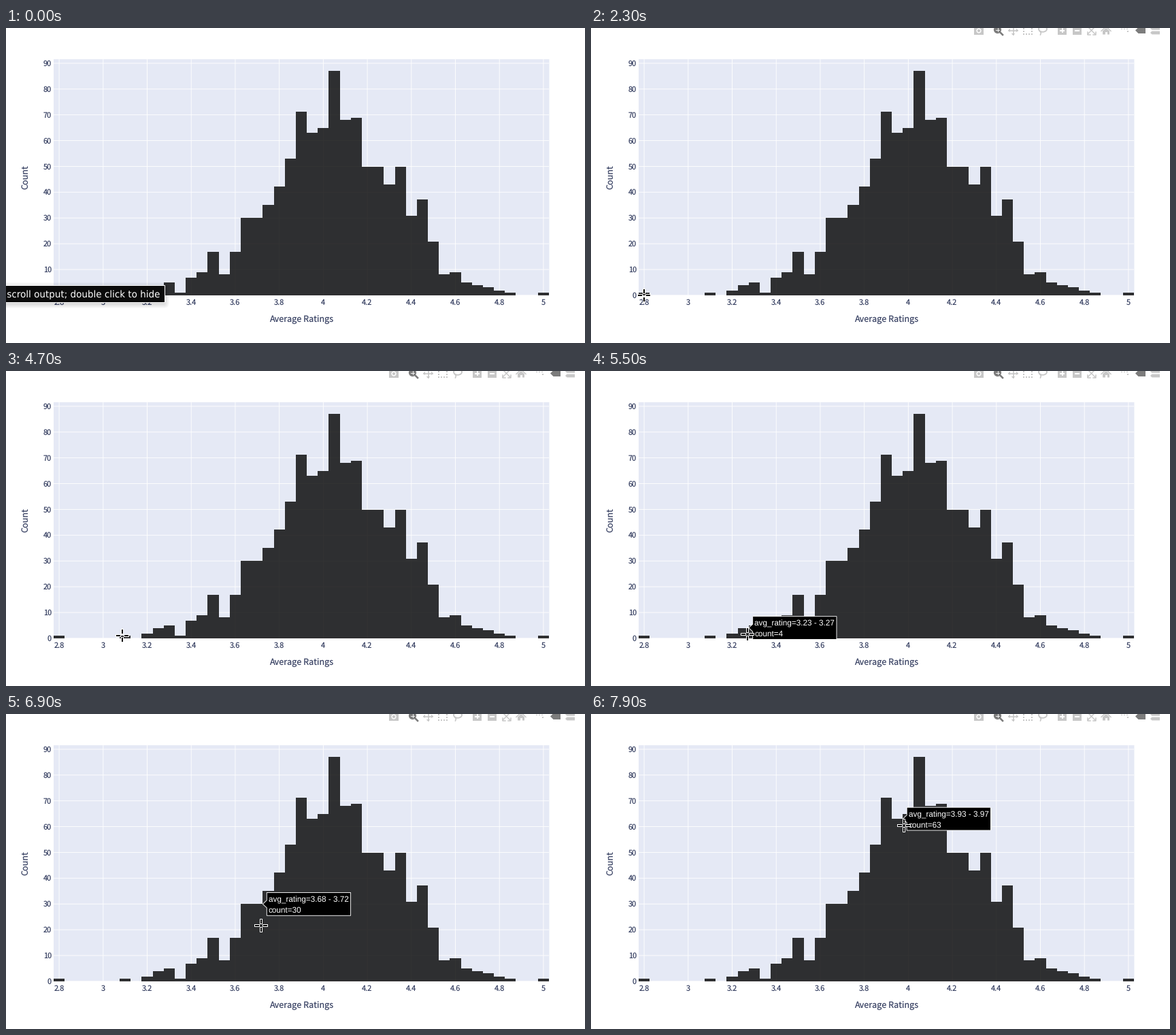
Animation of 851x463 px, one loop 8000 ms. Source, as a matplotlib script:

```python
import matplotlib.pyplot as plt
import numpy as np
from matplotlib.animation import FuncAnimation
from matplotlib.collections import PolyCollection
from matplotlib.patches import Circle, Ellipse, FancyBboxPatch, Polygon, Rectangle

plt.rcParams["text.hinting"] = "none"

W, H, DPI = 851, 463, 64
PT = 72 / DPI  # points per pixel
FRAMES, STEP = 80, 100

LEFT, RIGHT, TOP, BASE = 70, 798, 45.9, 392.88
ZOOM = 0.901  # page zoom: bars sit on whole page pixels before scaling
X_MIN, X_MAX, BIN = 2.775, 5.025, 0.05
UNIT = 347 * 0.95 / 87

INK = "#3c4566"
PLOT_BG = "#e5e9f5"
IDLE, ACTIVE = "#c7c7c7", "#7c7c7c"

# The charted data: one count per bin.
COUNTS = [1, 0, 0, 0, 0, 0, 1, 0, 2, 4, 5, 1, 7, 9, 17, 8, 17, 30, 30, 35,
          42, 53, 71, 63, 65, 87, 68, 69, 50, 50, 43, 50, 31, 37, 21, 8, 9,
          5, 4, 3, 2, 1, 0, 0, 1]

ENTER, FADE = 0.8, 0.4  # pointer enters, toolbar fades in (seconds)
LAG = 0.02  # the hover label trails the pointer

# Key points of the pointer: seconds, x, y.
PATH = np.array([
    (ENTER, 95, 384), (1.0, 135, 385), (1.3, 123, 391), (1.7, 81, 399),
    (2.0, 74, 397), (2.5, 81, 391), (3.8, 81, 391), (4.5, 168, 389),
    (4.7, 171, 389), (5.1, 174, 392), (5.3, 174, 394), (5.5, 230, 387),
    (5.7, 235, 386), (6.2, 292, 366), (6.5, 318, 352), (6.7, 349, 339),
    (6.9, 375, 311), (7.3, 420, 253), (7.9, 459.5, 164),
])

fig = plt.figure(figsize=(W / DPI, H / DPI), dpi=DPI, facecolor="white")
ax = fig.add_axes([0, 0, 1, 1])
ax.set_xlim(0, W)
ax.set_ylim(H, 0)
ax.axis("off")


def add(patch):
    return ax.add_patch(patch)


def box(x0, y0, x1, y1, color, z=1, smooth=False, **kw):
    return add(Rectangle((x0, y0), x1 - x0, y1 - y0, fc=color, lw=0,
                         aa=smooth, snap=not smooth, zorder=z, **kw))


def label(x, y, s, size, font="Noto Sans CJK JP", color=INK, **kw):
    return ax.text(x, y, s, fontsize=size * PT, family=font, color=color,
                   va="baseline", **kw)


def rating_x(value):
    return LEFT + (value - X_MIN) / (X_MAX - X_MIN) * (RIGHT - LEFT)


def bin_left(k):
    return rating_x(X_MIN + BIN * k)


def count_y(n):
    return BASE - n * UNIT


def bar_top(n):
    return BASE - round(n * UNIT / ZOOM) * ZOOM


def draw_chart():
    half = ZOOM / 2
    box(LEFT, TOP, RIGHT + half, BASE, PLOT_BG, smooth=True)
    for value in np.arange(2.8, 5.1, 0.2):
        x = rating_x(value)
        box(x - half, TOP, x + half, BASE, "white", 2, smooth=True)
        label(x, 407, f"{value:.1f}".replace(".0", ""), 11, ha="center")
    for n in range(0, 100, 10):
        y = count_y(n)
        box(LEFT, y - half, RIGHT, y + half, "white", 2, smooth=True)
        label(67, y + 4, str(n), 11, ha="right")
    for k, n in enumerate(COUNTS):
        if n:
            box(round(bin_left(k)), round(bar_top(n)),
                round(bin_left(k + 1)), round(BASE), "black", 3, alpha=0.8)
    label(434, 432, "Average Ratings", 12.6, ha="center")
    label(32, 219.5, "Count", 12.6, ha="center", rotation=90,
          rotation_mode="anchor")


def draw_toolbar():
    parts = []

    def shape(*pts, color=IDLE):
        parts.append(add(Polygon(pts, fc=color, lw=0)))

    def rect(x, y, w, h, color=IDLE):
        shape((x, y), (x + w, y), (x + w, y + h), (x, y + h), color=color)

    def line(xs, ys, width, color=IDLE):
        parts.extend(ax.plot(xs, ys, color=color, lw=width * PT))

    def disc(x, y, r, color):
        parts.append(add(Circle((x, y), r, fc=color, lw=0)))

    def tag(x, y, w, h, color=IDLE):
        shape((x, y), (x + h / 2, y - h / 2), (x + w, y - h / 2),
              (x + w, y + h / 2), (x + h / 2, y + h / 2), color=color)

    # camera
    rect(563, -1, 14, 10.5)
    disc(570, 4, 3.6, "white")
    disc(570, 4, 2.1, IDLE)
    # magnifier
    disc(597.5, 2.5, 5.6, ACTIVE)
    line([595, 600], [2.5, 2.5], 0.9, "white")
    line([597.5, 597.5], [0, 5], 0.9, "white")
    line([601, 605], [6, 10], 2.6, ACTIVE)
    # pan
    line([614, 627], [3.5, 3.5], 1.6)
    line([620.5, 620.5], [-3, 10], 1.6)
    for s in (-1, 1):
        tip = 620.5 + 7.5 * s
        shape((tip, 3.5), (tip - 3 * s, 0.8), (tip - 3 * s, 6.2))
    shape((620.5, 11), (617.8, 8), (623.2, 8))
    # box select
    for i in range(4):
        rect(635 + 4 * i, 8, 2, 2)
    for x in (635, 647):
        for y in (0, 4):
            rect(x, y, 2, 2)
    # lasso
    parts.append(add(Ellipse((664, 1.5), 12, 8.5, fc="none", ec=IDLE,
                             lw=1.8 * PT)))
    line([659.5, 661.5, 660.5], [4.5, 7, 10], 1.6)
    # zoom in and out
    for x in (686, 708):
        rect(x, -3, 13, 13)
        rect(x + 3, 2.6, 7, 2, "white")
    rect(691.5, 0, 2, 7, "white")
    # autoscale
    for s in (-1, 1):
        line([735.5 - 5.5 * s, 735.5 + 5.5 * s], [-2, 9], 1.4)
        line([735.5 + 6 * s, 735.5 + 6 * s, 735.5 + 2 * s], [6, 9.8, 9.8], 1.5)
    # home
    line([750, 757, 764], [4.5, -2, 4.5], 1.5)
    shape((752, 4.5), (757, 0), (762, 4.5), (762, 9.5), (752, 9.5))
    rect(755.5, 6, 3, 3.5, "white")
    # spike lines, closest, compare
    for i in range(3):
        rect(779 + 4 * i, 0.5, 2, 1.2)
    rect(788, 4, 1.5, 2)
    tag(800, 3.5, 15, 9, ACTIVE)
    for y in (0.3, 7):
        tag(822, y, 14, 4.8)
    return parts


def draw_hint():
    """Page tooltip that runs off the left edge."""
    parts = [add(FancyBboxPatch((-40, 382), 272, 22, fc="black", lw=0,
                                boxstyle=f"round,pad={grow}", alpha=0.02,
                                zorder=10)) for grow in range(1, 9)]
    parts.append(box(-40, 378, 234, 404, "white", 11))
    parts.append(box(-40, 379, 233, 403, "#0b0b0b", 12))
    parts.append(label(226, 396, "click to scroll output; double click to hide",
                       13.5, "DejaVu Sans", "white", ha="right", zorder=13))
    return parts


def arm_boxes(inset):
    """Four arms of the cross pointer around the origin."""
    a, b, h = 2 + inset, 10 - inset, 2 - inset
    right = np.array([(a, -h), (b, -h), (b, h), (a, h)], float)
    down = right[:, ::-1]
    return np.array([right, -right, down, -down])


draw_chart()
toolbar = draw_toolbar()
hint = draw_hint()

bubble = add(Polygon([(0, 0), (1, 1), (0, 1)], fc="black", ec="white",
                     lw=ZOOM * PT, zorder=20))
bubble_text = [label(0, 0, "", 11.7, "Liberation Sans", "white", zorder=21)
               for _ in range(2)]
cursor = []
for inset, color in ((0, "white"), (1, "black")):
    arms = PolyCollection(arm_boxes(inset), facecolors=color, linewidths=0,
                          antialiaseds=False, zorder=30 + inset)
    ax.add_collection(arms, autolim=False)
    cursor.append((arms, arm_boxes(inset)))


def pointer(t):
    return [np.interp(t, PATH[:, 0], PATH[:, c]) for c in (1, 2)]


def hovered(t):
    """Bin whose bar lies under the pointer, or None."""
    x, y = pointer(t - LAG)
    k = int((x - LEFT) / (RIGHT - LEFT) * len(COUNTS))
    inside = COUNTS[k] and bar_top(COUNTS[k]) <= y <= BASE + 0.1
    return k if t >= ENTER and inside else None


def show_bubble(k):
    for part in (bubble, *bubble_text):
        part.set_visible(k is not None)
    if k is None:
        return
    x, y = bin_left(k + 1), bar_top(COUNTS[k])
    l, r, t, b = x + 5.9, x + 129.2, y - 16.9, y + 16.9
    bubble.set_xy([(x, y), (l, y - 5.5), (l, t), (r, t), (r, b), (l, b),
                   (l, y + 5.5)])
    low = X_MIN + BIN * k + 0.005
    lines = (f"avg_rating={low:.2f} - {low + 0.04:.2f}", f"count={COUNTS[k]}")
    for i, (text, line) in enumerate(zip(bubble_text, lines)):
        text.set_position((l + 2.4, round(y - 2.6) + 15 * i))
        text.set_text(line)


def update(frame):
    t = frame * STEP / 1000
    entered = t >= ENTER
    for part in hint:
        part.set_visible(not entered)
    fade = np.clip((t - ENTER + 0.1) / FADE, 0, 1) if entered else 0
    for part in toolbar:
        part.set_alpha(fade)

    pos = np.round(pointer(t))
    for arms, shape in cursor:
        arms.set_visible(entered)
        arms.set_verts(shape + pos)

    show_bubble(hovered(t))
    return []


anim = FuncAnimation(fig, update, frames=FRAMES, interval=STEP, repeat=True,
                     repeat_delay=0, init_func=lambda: update(0), blit=False)
plt.show()
```
